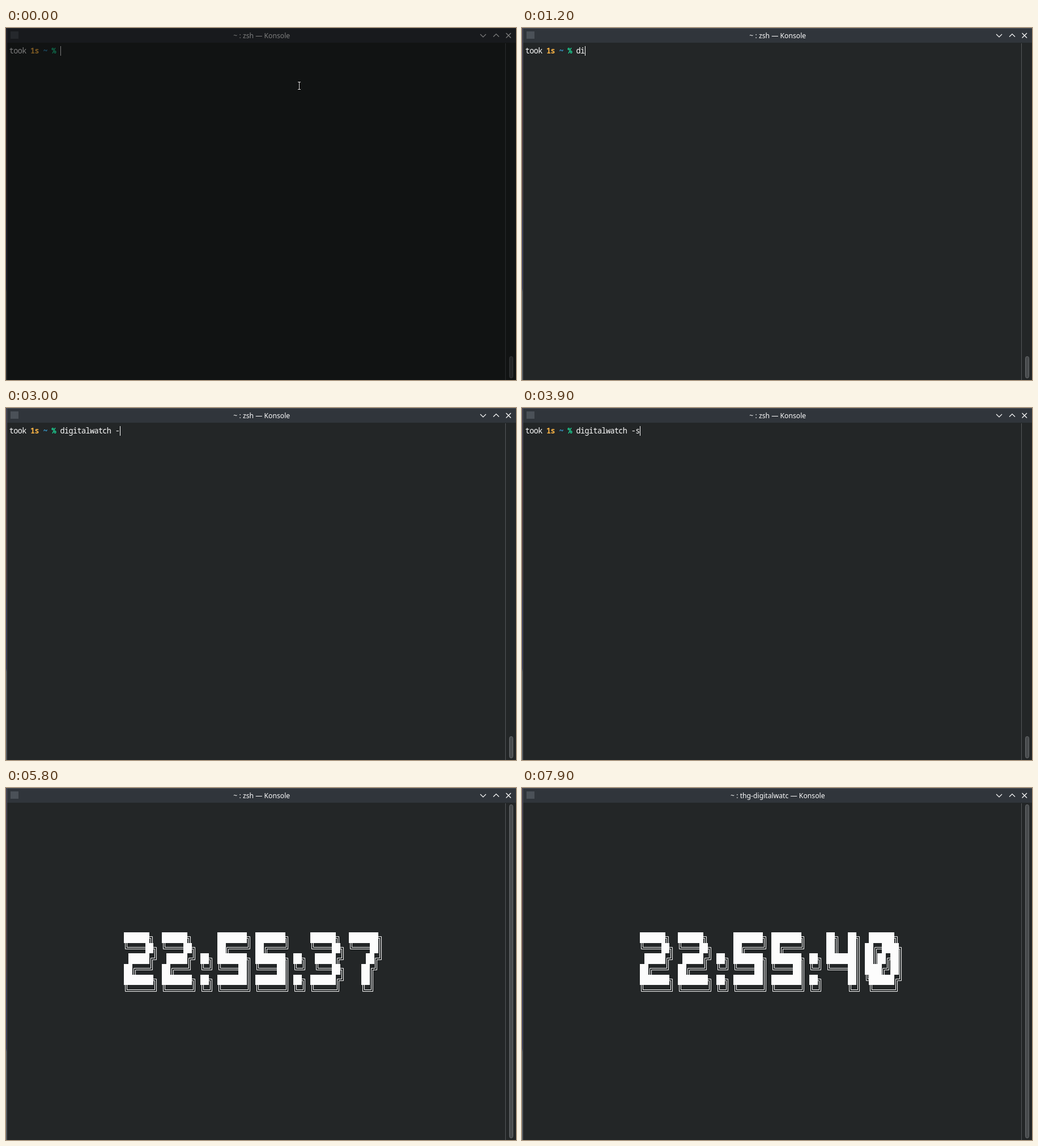
Write an HTML page with a canvas that moves like this. It is 900 px wide and 622 px high and loops after 8000 ms.

```html
<!DOCTYPE html>
<html lang="en">
<head>
<meta charset="utf-8">
<title>Terminal clock</title>
<style>
  html, body { margin: 0; height: 100%; overflow: hidden; background: #232627; }
  canvas { display: block; }
</style>
</head>
<body>
<canvas id="stage" width="900" height="622"></canvas>
<script>
const ctx = document.getElementById('stage').getContext('2d');
const LOOP = 8000;
const CLOCK_START = 5800;
const CELL = { x: 6, y: 30.8, w: 7.485, h: 18.67 };
const WHITE = '#fcfcfc';

// Darkness of the opening fade, one value per 100 ms.
const FADE = [0.5, 0.28, 0.1, 0.04];

const COMMAND = 'digitalwatch -style 3';
// Each entry: [time, number of typed characters]
const TYPING = [
  [1100, 1], [1200, 2], [1300, 3], [1400, 4],
  [1800, 5], [1900, 6], [2000, 7], [2100, 8], [2200, 9], [2300, 10],
  [2500, 11], [2700, 12], [2800, 13], [3000, 14], [3300, 15], [3400, 16],
  [3900, 15], [4200, 16], [4300, 17], [4500, 18], [4700, 19], [4900, 20], [5000, 21]
];
const CLOCK = [[5800, '22:55:37'], [5900, '22:55:38'], [6800, '22:55:39'], [7900, '22:55:40']];

const GLYPHS = {
  0: [' ██████╗', '██╔═████╗', '██║██╔██║', '████╔╝██║', '╚██████╔╝', ' ╚═════╝'],
  2: ['██████╗', '╚════██╗', ' █████╔╝', '██╔═══╝', '███████╗', '╚══════╝'],
  3: ['██████╗', '╚════██╗', ' █████╔╝', ' ╚═══██╗', '██████╔╝', '╚═════╝'],
  4: ['██╗  ██╗', '██║  ██║', '███████║', '╚════██║', '     ██║', '     ╚═╝'],
  5: ['███████╗', '██╔════╝', '███████╗', '╚════██║', '███████║', '╚══════╝'],
  7: ['███████╗', '╚════██║', '    ██╔╝', '   ██╔╝', '   ██║', '   ╚═╝'],
  8: [' █████╗', '██╔══██╗', '╚█████╔╝', '██╔══██╗', '╚█████╔╝', ' ╚════╝'],
  9: [' █████╗', '██╔══██╗', '╚██████║', ' ╚═══██║', ' █████╔╝', ' ╚════╝'],
  ':': ['', '', '██╗', '╚═╝', '██╗', '╚═╝']
};
// Directions in which each corner opens: horizontal, vertical
const CORNERS = { '╔': [1, 1], '╗': [-1, 1], '╚': [1, -1], '╝': [-1, -1] };

const colX = col => CELL.x + col * CELL.w;
const rowY = row => CELL.y + row * CELL.h;

// Value of the last entry that has begun at time t.
function valueAt(steps, t, initial) {
  let value = initial;
  for (const [start, v] of steps) if (t >= start) value = v;
  return value;
}

function rect(color, x, y, w, h) {
  ctx.fillStyle = color;
  ctx.fillRect(x, y, w, h);
}

function polyline(color, width, points) {
  ctx.strokeStyle = color;
  ctx.lineWidth = width;
  ctx.beginPath();
  points.forEach(([x, y]) => ctx.lineTo(x, y));
  ctx.stroke();
}

function drawBoxChar(char, col, row) {
  const left = Math.round(colX(col)), right = Math.round(colX(col + 1));
  const top = Math.round(rowY(row)), bottom = Math.round(rowY(row + 1));
  if (char === '█') return rect(WHITE, left, top, right - left, bottom - top);

  const cx = Math.round(colX(col + 0.5)), cy = Math.round(rowY(row + 0.5));
  for (const gap of [-1.5, 1.5]) {
    if (char === '═') polyline(WHITE, 1, [[left, cy + gap], [right, cy + gap]]);
    if (char === '║') polyline(WHITE, 1, [[cx + gap, top], [cx + gap, bottom]]);
    if (char in CORNERS) {
      const [h, v] = CORNERS[char];
      const x = cx + h * gap, y = cy + v * gap;
      polyline(WHITE, 1, [[h > 0 ? right : left, y], [x, y], [x, v > 0 ? bottom : top]]);
    }
  }
}

function drawClock(time) {
  let col = 27;
  for (const char of time) {
    GLYPHS[char].forEach((line, row) =>
      [...line].forEach((part, i) => drawBoxChar(part, col + i, 12 + row)));
    col += char === ':' ? 4 : 9;
  }
}

function drawCells(text, col, color, weight = 400) {
  ctx.font = `${weight} 13.5px "Noto Sans Mono", monospace`;
  ctx.fillStyle = color;
  ctx.textAlign = 'center';
  [...text].forEach((char, i) => ctx.fillText(char, colX(col + i + 0.5), 45));
}

function drawPrompt(typed) {
  drawCells('took', 0, WHITE);
  drawCells('1s', 5, '#f5b145', 700);
  drawCells('~', 8, '#3daee9', 700);
  drawCells('%', 10, '#1cdc9a', 700);
  // The first attempt after "-s" is a slip that gets erased.
  const text = typed.slip ? COMMAND.slice(0, 15) + 'y' : COMMAND.slice(0, typed.count);
  drawCells(text, 12, WHITE);
  rect(WHITE, Math.round(colX(12 + text.length)), 32, 1, 17);
}

function drawWindow(title, scrollTop) {
  rect('#232627', 0, 0, 900, 622);
  rect('#30353b', 0, 0, 900, 26);
  rect('#50565d', 0, 0, 900, 1);

  const edge = ctx.createLinearGradient(0, 0, 0, 622);
  [[0, '#3c3450'], [0.15, '#4b3045'], [0.17, '#5a2c35'], [0.5, '#4c2c34'],
   [0.56, '#2b2d5c'], [0.74, '#2b2d5c'], [0.75, '#5c6066'], [1, '#5c6066']]
    .forEach(([at, color]) => edge.addColorStop(at, color));
  rect(edge, 0, 0, 1, 622);
  rect('#565a60', 1, 0, 1, 622);

  rect('#4b5158', 8, 6, 14, 13);

  ctx.font = '12.2px "Noto Sans", sans-serif';
  ctx.fillStyle = WHITE;
  ctx.textAlign = 'center';
  ctx.fillText(title, 451.3, 17.6);

  polyline(WHITE, 1.2, [[837, 11], [842, 16], [847, 11]]);
  polyline(WHITE, 1.2, [[860, 15.5], [865, 10.5], [870, 15.5]]);
  polyline(WHITE, 1.2, [[882.5, 9], [891, 17.5]]);
  polyline(WHITE, 1.2, [[891, 9], [882.5, 17.5]]);

  rect('#54585a', 881, 27, 1, 595);
  ctx.beginPath();
  ctx.roundRect(888.5, scrollTop + 0.5, 6, 618 - scrollTop, 3);
  ctx.fillStyle = '#484b4d';
  ctx.fill();
  ctx.strokeStyle = '#696c6e';
  ctx.lineWidth = 1;
  ctx.stroke();
}

function drawPointer() {
  for (const [color, width] of [['#000', 3], ['#eee', 1]]) {
    polyline(color, width, [[517.5, 95], [517.5, 109]]);
    polyline(color, width, [[515, 95.5], [520, 95.5]]);
    polyline(color, width, [[515, 108.5], [520, 108.5]]);
  }
}

function draw(t) {
  const running = t >= CLOCK_START;
  drawWindow(t < 6300 ? '~ : zsh — Konsole' : '~ : thg-digitalwatc — Konsole', running ? 29 : 580);
  if (running) drawClock(valueAt(CLOCK, t));
  else drawPrompt({ count: valueAt(TYPING, t, 0), slip: t >= 3400 && t < 3900 });

  const dark = FADE[Math.floor(t / 100)] || 0;
  if (dark) rect(`rgba(0, 0, 0, ${dark})`, 0, 0, 900, 622);
  if (t < 1100) drawPointer();
}

let start;
function tick(now) {
  start ??= now;
  draw((now - start) % LOOP);
  requestAnimationFrame(tick);
}
requestAnimationFrame(tick);
</script>
</body>
</html>
```
